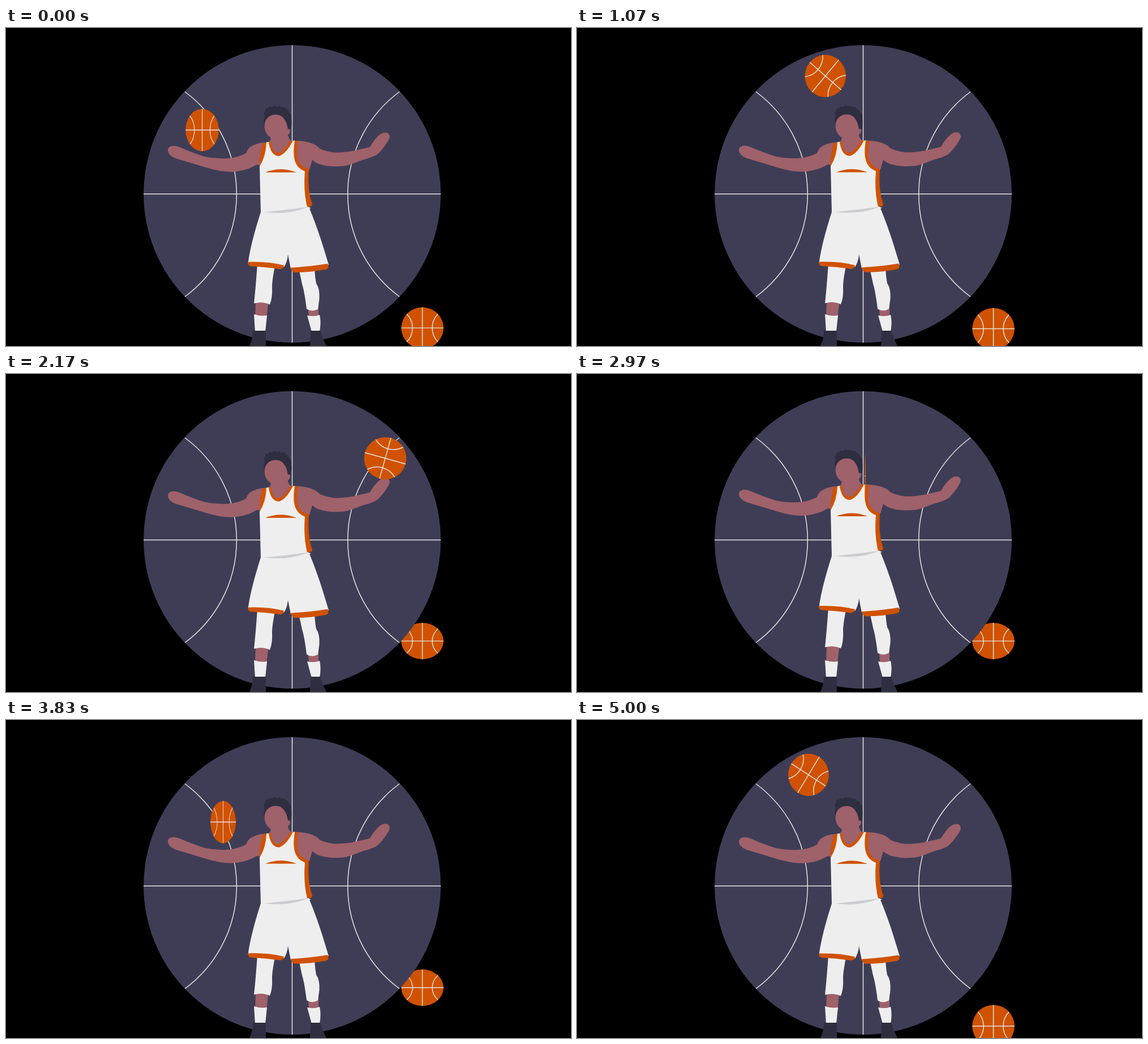
An HTML page for the animation above (5.13 s loop, 998 by 561 pixels).

```html
<!DOCTYPE html>
<html lang="en">
<head>
<meta charset="utf-8">
<title>Ball spinner</title>
<style>
  html, body { margin: 0; width: 100%; height: 100%; overflow: hidden; background: #000; }
  svg { display: block; width: 100vw; height: 100vh; }
  .skin { fill: #9f616a; }
  .dark { fill: #2f2e41; }
  .cloth { fill: #eee; }
  .trim { fill: #d05200; }
  .line { fill: none; stroke: #e6e3e0; stroke-width: 1.5; }
</style>
</head>
<body>
<svg viewBox="0 0 998 561">
  <defs>
    <g id="ball">
      <circle class="trim" r="37.3"/>
      <path class="line" d="M-37.3 0H37.3M0-37.3V37.3M-27.5-25A36 36 0 0 1-27.5 25M27.5-25A36 36 0 0 0 27.5 25"/>
    </g>
  </defs>

  <use href="#ball" id="bouncer"/>

  <circle cx="505.5" cy="292.7" r="262.4" fill="#3f3d56"/>
  <path class="line" d="M505.5 30.5V555M243 292.8H768M316 112.5A224.5 224.5 0 0 1 316 474M695 112.5A224.5 224.5 0 0 0 695 474"/>

  <g id="body">
    <g id="legs">
      <path class="skin" d="M441 476L464 478Q461 497 460 514H440Z"/>
      <path class="skin" d="M533 486H552V514H536Z"/>
      <path class="cloth" d="M444 412H476Q470 440 470 453Q471 472 466 484Q453 478 438 482Q441 455 444 412Z"/>
      <path class="cloth" d="M517 420H545Q546 438 548 447Q554.500 456 553.500 474L551 492Q541 498 531 492Q527 460 523 448Z"/>
    </g>
    <g id="arms" class="skin">
      <path d="M458 198Q441 199 430 207Q426 211 424 217Q412 224 394 226Q372 228 350 223Q326 215 308 207Q298 203 292 204.500Q285 207 286 213Q287 221 299 226Q326 234 352 242Q378 250 398 250Q421 249 438 240Q444 235 449 239L470 236Z"/>
      <path d="M508 195Q540 195 552 207Q556 212 580 216Q603 216 622 211Q637 208 643 206Q649 195 658 186Q668 178 675 182Q681 187 674 197Q665 211 656 219Q649 224 630 229L609 237Q593 242 571 240Q550 238 541 229L536 246L510 240Z"/>
    </g>
    <path class="skin" d="M468 180H497Q498 193 506 197Q508 226 486 228Q464 224 463 199Q468 195 468 188Z"/>
    <path class="dark" d="M457 176Q454 158 457 152Q453 147 458 143Q457 137 463 138Q465 133 470 136Q474 131 478 135Q483 132 486 136Q491 134 494 139Q499 140 500 145Q505 149 504 155Q506 167 502 177L497 182Z"/>
    <path class="skin" d="M477 149C489 149 496 160 498 175Q502 173 502 178Q501 184 497 185Q493 194 480 193C465 193 456.500 181 456.500 169C457 156 465 149 477 149Z"/>

    <path class="cloth" d="M459 198L466 197Q467 219 484 221Q497 214 503 195L511 195C508 222 510 240 530 246Q525 282 534 312L539 314Q502 326 450 322L448 240Q457 222 459 198Z"/>
    <path class="trim" d="M464 198L468.500 196Q469 215 480 217Q491 215 502 195L507 194.500Q496 217 483 222Q468 223 464 198Z"/>
    <path class="trim" d="M453 199.500L460 198Q459 223 448 240Q447 226 453 199.500Z"/>
    <path class="trim" d="M510 195L516 195.500C512 222 512 240 535 245Q532 284 541 307Q541 312 532 312Q525 284 528 249C508 241 506 222 510 195Z"/>
    <path class="trim" d="M458 251Q485 240 513 251Z"/>

    <path class="cloth" d="M450 321Q500 323 535 312Q549 346 559 378L570 414Q538 417 503 421L498 396Q497 409 491 418Q458 414 427.500 411Q432 377 450 321Z"/>
    <path d="M456 321Q500 317 535 311.500Q500 327 456 321Z" fill="#cdccd0"/>
    <path class="trim" d="M428 409Q464 408 491 415Q490 421 484 421.500Q461 418 432 416.500Q426 415 428 409Z"/>
    <path class="trim" d="M503 419Q538 417 568 412Q572 419 566 422Q541 427 509 427.500Q504 425 503 419Z"/>
  </g>

  <path class="cloth" d="M438 505Q449 509 461 507L458 536H440Z"/>
  <path class="cloth" d="M532 507Q544 510 554 506Q557 519 554 536H540Z"/>
  <path class="dark" d="M436 534H459V561H430Q436 548 436 534Z"/>
  <path class="dark" d="M538 534H555Q559 548 566 561H537Z"/>

  <use href="#ball" id="spinner"/>
</svg>

<script>
const LOOP = 5130, TICK = 100 / 3, FIRST = 35, LAST = 5000;
const BOUNCE_START = 617, SPIN_START = 600;
const CX = 505.5, CY = 292.7, RADIUS = 218.5;

const part = id => document.getElementById(id);
const bouncer = part('bouncer'), spinner = part('spinner'), body = part('body');
const mod = (a, b) => ((a % b) + b) % b;
const mix = (a, b, p) => a + (b - a) * p;

// cubic-bezier(.25, .1, .25, 1)
function ease(x) {
  if (x <= 0) return 0;
  if (x >= 1) return 1;
  let lo = 0, hi = 1, s = 0.5;
  for (let i = 0; i < 24; i++) {
    s = (lo + hi) / 2;
    const at = 0.75 * s * (1 - s) + s * s * s;
    if (at < x) lo = s; else hi = s;
  }
  return 0.3 * (1 - s) * (1 - s) * s + 3 * (1 - s) * s * s + s * s * s;
}

function bounce(t) {
  const p = mod(t - BOUNCE_START, 800) / 400;
  const drop = p < 1 ? ease(p) : 1 - ease(p - 1);
  bouncer.setAttribute('transform',
    `translate(735.5 ${mix(470.5, 540, drop)}) scale(1 ${mix(0.86, 1, drop)})`);
}

function spin(t) {
  const p = mod(t - SPIN_START, 4000);
  let x, y = 180, wide, turn = 0;
  if (p < 1955) {
    // over the head, along an arc around the court centre
    const swing = 111 * ease(p / 2000);
    const a = (swing - 59) * Math.PI / 180;
    x = CX + RADIUS * Math.sin(a);
    y = CY - RADIUS * Math.cos(a);
    turn = swing * 0.98;
    wide = Math.min(1, 0.93 + swing / 1000);
  } else {
    // flat way back, thin at the middle
    const side = p < 3060
      ? mix(-1, 0.53, ease((p - 1955) / 1105))
      : mix(0.53, 1, ease((p - 3060) / 940));
    x = CX - 187 * side;
    wide = Math.max(0.02, 0.925 * Math.abs(side));
  }
  spinner.setAttribute('transform', `translate(${x} ${y}) scale(${wide} 1) rotate(${turn})`);
}

function sway(t) {
  const drop = 1.9 * (1 + Math.cos((t + 10) * Math.PI / 600));
  body.setAttribute('transform', `translate(0 ${drop})`);
}

const begin = performance.now();
function draw() {
  const t = mod(performance.now() - begin, LOOP);
  const step = Math.floor((t + 4) / TICK) * TICK;
  const time = Math.min(LAST, Math.max(FIRST, step));
  bounce(time);
  spin(time);
  sway(time);
  requestAnimationFrame(draw);
}
draw();
</script>
</body>
</html>
```
